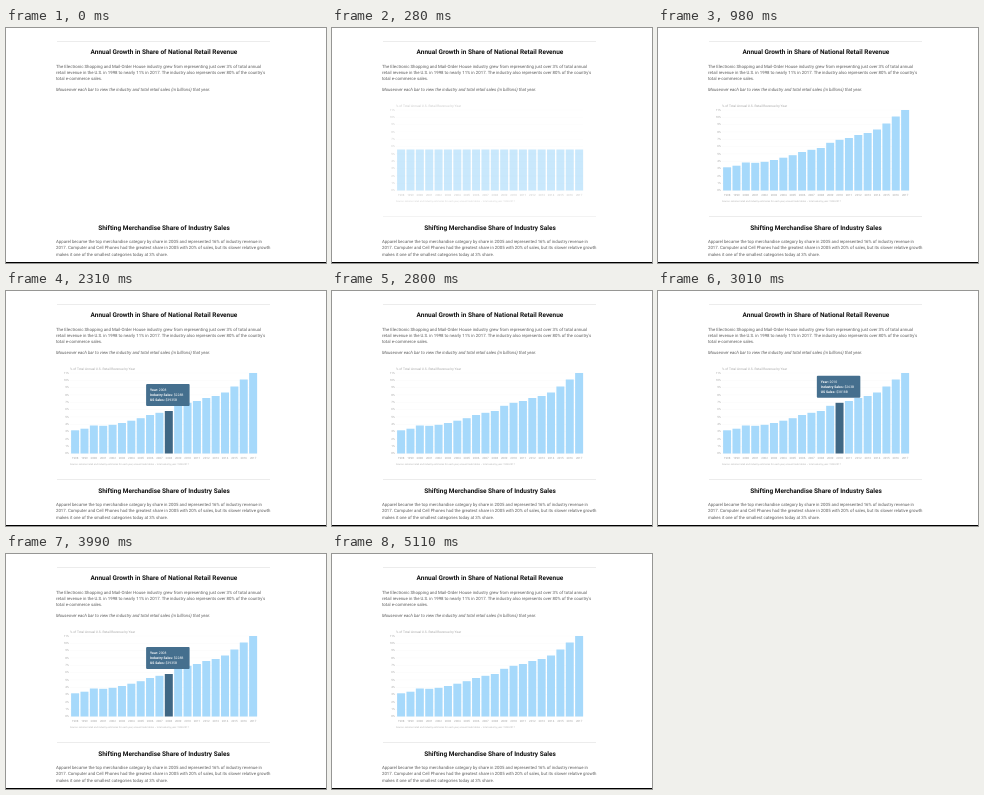
Recreate the animation shown at these times as an HTML page with a canvas. Size 320 by 235 pixels, loop 5.46 s.

```html
<!DOCTYPE html>
<html lang="en">
<head>
<meta charset="utf-8">
<title>Retail revenue chart</title>
<style>
  html, body { margin: 0; width: 100%; height: 100%; overflow: hidden; background: #fff; }
  canvas, svg { position: absolute; left: 0; top: 0; width: 320px; height: 235px; display: block; }
  text { font-family: Roboto, Arial, sans-serif; text-rendering: geometricPrecision; }
  .head { font-size: 6.48px; font-weight: 700; fill: #111; text-anchor: middle; }
  .body { font-size: 4.34px; fill: #5c5c5c; }
  .note { font-style: italic; }
  .axis { font-size: 2.9px; fill: #a4a4a4; }
  .caption { font-size: 3.25px; fill: #a4a4a4; }
  .year { text-anchor: middle; }
  .pct { text-anchor: end; }
  .source { font-size: 2.42px; fill: #b0b0b0; }
  .tip { font-size: 3.4px; fill: #fff; }
  .tip .name { font-weight: 700; }
</style>
</head>
<body>
<canvas id="stage"></canvas>
<svg viewBox="0 0 320 235">
  <text class="head" x="158" y="26.4">Annual Growth in Share of National Retail Revenue</text>
  <g class="body">
    <text x="50" y="39.6">The Electronic Shopping and Mail-Order House industry grew from representing just over 3% of total annual</text>
    <text x="50" y="45.8">retail revenue in the U.S. in 1998 to nearly 11% in 2017. The industry also represents over 80% of the country's</text>
    <text x="50" y="52">total e-commerce sales.</text>
    <text class="note" x="50" y="62.8">Mouseover each bar to view the industry and total retail sales (in billions) that year.</text>
    <text x="50" y="215">Apparel became the top merchandise category by share in 2005 and represented 16% of industry revenue in</text>
    <text x="50" y="221.3">2017. Computer and Cell Phones had the greatest share in 2005 with 20% of sales, but its slower relative growth</text>
    <text x="50" y="227.6">makes it one of the smallest categories today at 3% share.</text>
  </g>
  <text class="head" x="158" y="202.4">Shifting Merchandise Share of Industry Sales</text>
  <g id="labels">
    <text class="caption" x="64" y="79">% of Total Annual U.S. Retail Revenue by Year</text>
    <text class="source" x="64" y="174.3">Source: national retail and industry estimates for each year, annual trade tables – total sales by year: 1998-2017</text>
  </g>
  <g id="tip" class="tip">
    <text x="4" y="7.2"><tspan class="name">Year:</tspan> <tspan id="tipYear"></tspan></text>
    <text x="4" y="12.2"><tspan class="name">Industry Sales:</tspan> <tspan id="tipIndustry"></tspan></text>
    <text x="4" y="17"><tspan class="name">US Sales:</tspan> <tspan id="tipTotal"></tspan></text>
  </g>
</svg>
<script>
const W = 320, H = 235, LOOP = 5460, STEP = 70;
const BASE = 162.5, ROW = 7.32, LEFT = 65.1, PITCH = 9.37, BAR = 8;
const START_HEIGHT = 41;
const tops = [139.3, 137.7, 134.5, 134.8, 133.8, 132, 129.7, 127.2, 124, 121.8,
              120, 114.8, 111.8, 110, 107, 105, 101.5, 95.5, 88.5, 82];
const sales = { 10: ['$228B', '$3935B'], 11: ['$235B', '$3613B'], 12: ['$263B', '$3818B'] };
// [start time, hovered bar]
const hovers = [[0, -1], [2310, 10], [2800, -1], [2870, 11], [3010, 12], [3710, -1],
                [3780, 11], [3850, -1], [3990, 10], [5110, -1]];

const $ = id => document.getElementById(id);
const canvas = $('stage'), ctx = canvas.getContext('2d');
const labels = $('labels'), tip = $('tip');
const ratio = window.devicePixelRatio || 1;
canvas.width = W * ratio;
canvas.height = H * ratio;

const clamp = v => Math.max(0, Math.min(1, v));
const easeInOut = u => u < 0.5 ? 4 * u ** 3 : 1 - (2 - 2 * u) ** 3 / 2;

function addLabel(kind, x, y, text) {
  const el = document.createElementNS(labels.namespaceURI, 'text');
  el.setAttribute('class', 'axis ' + kind);
  el.setAttribute('x', x);
  el.setAttribute('y', y);
  el.textContent = text;
  labels.append(el);
}
tops.forEach((_, i) => addLabel('year', LEFT + BAR / 2 + i * PITCH, 167.8, 1998 + i));
for (let i = 0; i <= 11; i++) addLabel('pct', 63, BASE - i * ROW + 0.8, i + '%');

function rect(color, x, y, w, h) {
  ctx.fillStyle = color;
  ctx.fillRect(x, y, w, h);
}

function drawTip(bar) {
  tip.style.display = bar < 0 ? 'none' : '';
  if (bar < 0) return;
  const x = LEFT + bar * PITCH - 18.7, y = tops[bar] - 27;
  ctx.fillStyle = '#456f8e';
  ctx.beginPath();
  ctx.roundRect(x, y, 43.5, 22, 1);
  ctx.fill();
  tip.setAttribute('transform', `translate(${x} ${y})`);
  $('tipYear').textContent = 1998 + bar;
  $('tipIndustry').textContent = sales[bar][0];
  $('tipTotal').textContent = sales[bar][1];
}

function draw(time) {
  const t = Math.floor(time % LOOP / STEP) * STEP;
  const fade = clamp((t - 70) / 350);
  const grow = easeInOut(clamp((t - 395) / 585));
  const hover = hovers.filter(h => h[0] <= t).pop()[1];

  ctx.setTransform(ratio, 0, 0, ratio, 0, 0);
  rect('#fff', 0, 0, W, H);
  rect('#000', 0, 234, W, 1);
  rect('#ececec', 51, 13, 213, 1);

  ctx.globalAlpha = fade;
  labels.setAttribute('opacity', fade);
  rect('#ececec', 51, 188, 213, 1);
  for (let i = 0; i <= 11; i++) rect('#f9f9f9', 64, BASE - i * ROW - 0.25, 187, 0.5);
  tops.forEach((top, i) => {
    const h = START_HEIGHT + (BASE - top - START_HEIGHT) * grow;
    rect(i === hover ? '#3f6784' : '#a6d9fb', LEFT + i * PITCH, BASE - h, BAR, h);
  });
  ctx.globalAlpha = 1;
  drawTip(hover);
}

const begin = performance.now();
function tick() {
  draw(performance.now() - begin);
  requestAnimationFrame(tick);
}
tick();
</script>
</body>
</html>
```
